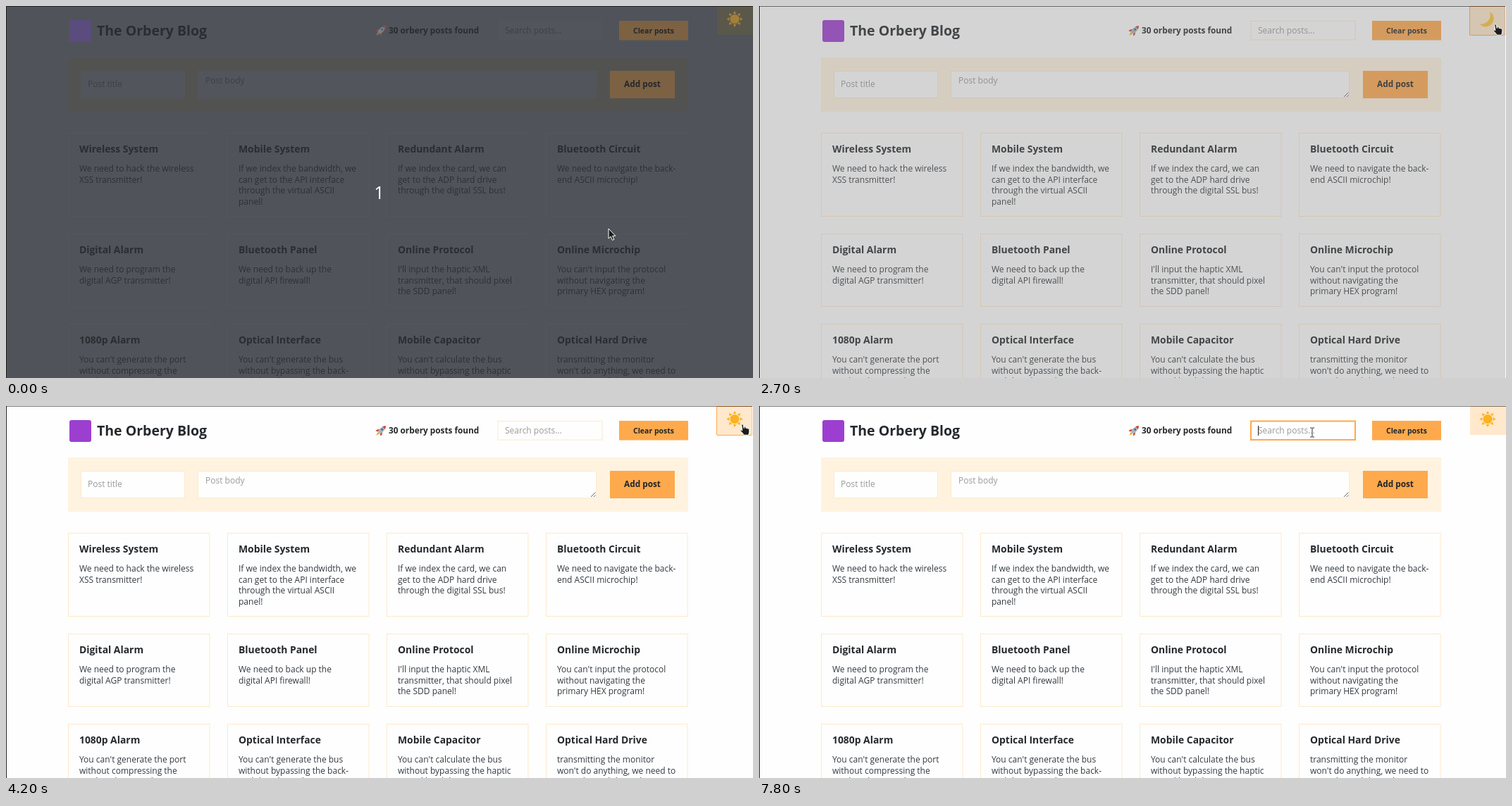
These frames come from a looping animation (1060 px wide and 528 px high, 8 s). An HTML page:

```html
<!DOCTYPE html>
<html lang="en">
<head>
<meta charset="utf-8">
<title>Blog theme toggle</title>
<style>
html, body { margin: 0; width: 100%; height: 100%; overflow: hidden; background: #fefefe; }
svg { position: absolute; left: 0; top: 0; width: 1060px; height: 528px; display: block; }
body {
  --bg: #fefefe; --strong: #25292d; --text: #343a40; --hint: #9a9a98;
  --form: #fff3e0; --field: #fefefe; --line: #ffe8cc; --btn: #ffa94d;
  --btnText: #212529; --toggle: #ffe8cc; --logo: #9c3fd0; --icon: 1;
}
body.count {
  --bg: #50545a; --strong: #2a2d31; --text: #2d3135; --hint: #3d4146;
  --form: #525351; --field: #52555b; --line: #535559; --btn: #7d6143;
  --btnText: #26282b; --toggle: #5a574b; --logo: #5b4c7e; --icon: .45;
}
text { font-family: "Open Sans", "Noto Sans", sans-serif; font-size: 12px; fill: var(--text); white-space: pre; }
.b { font-weight: 700; fill: var(--strong); }
.hint { fill: var(--hint); }
.btnText { font-weight: 700; fill: var(--btnText); text-anchor: middle; }
.bg { fill: var(--bg); }
.form { fill: var(--form); }
.field { fill: var(--field); stroke: var(--line); }
.card { fill: none; stroke: var(--line); }
.btn { fill: var(--btn); }
.toggle { fill: var(--toggle); }
.logo { fill: var(--logo); }
.icon { opacity: var(--icon); }
.cursor { fill: #1c1c1c; stroke: #fff; stroke-width: 1; stroke-linejoin: round; }
</style>
</head>
<body>
<svg id="page" viewBox="0 0 1060 528">
  <rect class="bg" width="1060" height="528"/>
  <rect class="logo" x="90" y="20" width="31" height="31" rx="3"/>
  <text class="b" x="129" y="42" style="font-size:19.5px">The Orbery Blog</text>

  <g class="icon" transform="translate(532.5 34.5) rotate(45)">
    <path d="M-1.6 5L0 10.5 1.6 5Z" fill="#ffa000"/>
    <path d="M-2.5 0L-5 3.5V6.5L-2.2 4.5ZM2.5 0L5 3.5V6.5L2.2 4.5Z" fill="#d8402f"/>
    <path d="M0-9C3.6-5.5 3.6 1 2.2 5H-2.2C-3.6 1-3.6-5.5 0-9Z" fill="#a9b6bd"/>
    <path d="M0-9C1.3-7.8 2.1-6.5 2.4-5H-2.4C-2.1-6.5-1.3-7.8 0-9Z" fill="#d8402f"/>
    <circle cy="-1.7" r="1.5" fill="#35718f"/>
  </g>
  <text class="b" x="543" y="39" style="font-size:11.8px">30 orbery posts found</text>

  <rect id="search" class="field" x="698" y="21.5" width="148" height="26.5"/>
  <text class="hint" x="708" y="39">Search posts...</text>
  <path id="caret" d="M708.5 28V42" stroke="#222"/>
  <rect class="btn" x="870" y="21" width="98" height="27.5"/>
  <text class="btnText" x="919" y="38.5" style="font-size:10.5px">Clear posts</text>

  <rect class="form" x="88" y="73" width="880" height="77"/>
  <rect class="field" x="106.5" y="92.5" width="147" height="38"/>
  <text class="hint" x="116" y="115">Post title</text>
  <rect class="field" x="272.5" y="92.5" width="565" height="38"/>
  <text class="hint" x="283" y="110">Post body</text>
  <path d="M830 129L836.5 122.5M834 129L836.5 126.5" stroke="#555" stroke-width=".9"/>
  <rect class="btn" x="857" y="92" width="92" height="39"/>
  <text class="btnText" x="903" y="115.3" style="font-size:11.8px">Add post</text>

  <g id="cards"></g>

  <rect class="toggle" x="1009" y="0" width="51" height="41"/>
  <rect id="ring" x="1008.5" y=".5" width="50.5" height="41" rx="1.5" fill="none" stroke="#ffa94d"/>
  <g id="sun" class="icon" transform="translate(1034 18.5)" fill="#fbb323"></g>
  <path id="moon" d="M1037 8A11.5 11.5 0 1 1 1022.5 25.5A13.2 13.2 0 0 0 1037 8Z" fill="#fcc63a"/>
</svg>

<svg id="over" viewBox="0 0 1060 528">
  <rect width="1060" height="1" fill="#000" opacity=".5"/>
  <rect width="1" height="528" fill="#222"/>
  <rect id="edge" x="1059" width="1" height="528" fill="#fdfdfd"/>
  <text id="digit" x="529.5" y="273.5" text-anchor="middle" style="font-size:25.5px;fill:#fff">1</text>
  <g id="cursor">
    <path id="arrow" class="cursor" d="M0 0V14L3.2 11.2 5.5 16.4 7.9 15.4 5.6 10.3H9.8Z"/>
    <path id="hand" class="cursor" d="M-1.2 1.2C-1.4-.4 1-.6 1.3 1L2.2 5.6C3-.0 5 4.6 5.2 5.8C6 4.8 7.4 5.2 7.6 6.3C8.6 5.7 9.6 6.3 9.7 7.6C9.9 10 9.8 12 8.6 15.2H2C.8 12.6-1.4 11-2.8 9.2C-3.2 8-1.5 7.4-.2 9Z"/>
    <g id="beam" fill="none">
      <path d="M-3-6.5H3M-3 6.5H3M0-6.5V6.5" stroke="#fff" stroke-width="2.4" opacity=".7"/>
      <path d="M-3-6.5H-.8L0-5.8 .8-6.5H3M-3 6.5H-.8L0 5.8 .8 6.5H3M0-6V6" stroke="#333"/>
    </g>
  </g>
</svg>

<script>
const LOOP = 8000, STEP = 100;
const $ = id => document.getElementById(id);

const rows = [
  { y: 180.5, h: 118, posts: [
    "Wireless System|We need to hack the wireless|XSS transmitter!",
    "Mobile System|If we index the bandwidth, we|can get to the API interface|through the virtual ASCII|panel!",
    "Redundant Alarm|If we index the card, we can|get to the ADP hard drive|through the digital SSL bus!",
    "Bluetooth Circuit|We need to navigate the back-|end ASCII microchip!"] },
  { y: 323.5, h: 103, posts: [
    "Digital Alarm|We need to program the|digital AGP transmitter!",
    "Bluetooth Panel|We need to back up the|digital API firewall!",
    "Online Protocol|I'll input the haptic XML|transmitter, that should pixel|the SDD panel!",
    "Online Microchip|You can't input the protocol|without navigating the|primary HEX program!"] },
  { y: 451.5, h: 103, posts: [
    "1080p Alarm|You can't generate the port|without compressing the|auxiliary bus panel!",
    "Optical Interface|You can't generate the bus|without bypassing the back-|end digital panel!",
    "Mobile Capacitor|You can't calculate the bus|without bypassing the haptic|neural hard drive!",
    "Optical Hard Drive|transmitting the monitor|won't do anything, we need to|input the mobile card!"] }
];

function cardMarkup(post, col, { y, h }) {
  const [title, ...lines] = post.split("|");
  const x = 104 + 226 * col;
  const body = lines.map((s, i) => `<text x="${x}" y="${y + 54.5 + 15.5 * i}">${s}</text>`).join("");
  return `<rect class="card" x="${x - 15.5}" y="${y}" width="200.5" height="${h}"/>` +
    `<text class="b" x="${x}" y="${y + 27}" style="font-size:13.9px">${title}</text>${body}`;
}
$("cards").innerHTML = rows.map(r => r.posts.map((p, i) => cardMarkup(p, i, r)).join("")).join("");

$("sun").innerHTML = '<circle r="6.6"/>' + Array.from({ length: 8 }, (_, i) =>
  `<path d="M-2.4-7.6L0-11.6 2.4-7.6Z" transform="rotate(${45 * i})"/>`).join("");

// time, x, y of the pointer
const path = [
  [1100, 855, 316], [1200, 858, 298], [1300, 878, 220], [1400, 911, 128], [1500, 946, 68],
  [1600, 975, 39], [1700, 1008, 24], [1800, 1038, 16], [1900, 1051, 14],
  [2000, 1051, 14], [2300, 1045, 26], [4700, 1045, 26],
  [4800, 1038, 18], [4900, 965, 8], [5000, 800, 22], [5200, 375, 76], [5300, 215, 98],
  [5400, 153, 106], [5500, 165.5, 103.5], [6700, 165.5, 103.5],
  [6800, 176, 100], [6900, 290, 82], [7100, 760, 34], [7200, 930, 25], [7300, 1016, 22],
  [7400, 930, 29], [7500, 825, 36], [7600, 785, 37.5]
];

function pointer(t) {
  const i = path.findIndex(p => p[0] > t);
  if (i === 0) return path[0].slice(1);
  if (i < 0) return path[path.length - 1].slice(1);
  const [a, b] = [path[i - 1], path[i]];
  const k = (t - a[0]) / (b[0] - a[0]);
  return [a[1] + (b[1] - a[1]) * k, a[2] + (b[2] - a[2]) * k];
}

// left, top, right, bottom
const fields = [[106, 92, 254, 131], [272, 92, 838, 131], [698, 21, 846, 49]];
const buttons = [[870, 21, 968, 49], [857, 92, 949, 131], [1009, 0, 1060, 41]];

function pointerKind(x, y) {
  const inside = ([l, t, r, b]) => x >= l && x <= r && y >= t && y <= b;
  return fields.some(inside) ? "beam" : buttons.some(inside) ? "hand" : "arrow";
}

// CSS "ease": cubic-bezier(.25, .1, .25, 1)
function ease(x) {
  if (x <= 0) return 0;
  if (x >= 1) return 1;
  const bez = (s, a, b) => 3 * s * (1 - s) * ((1 - s) * a + s * b) + s ** 3;
  let lo = 0, hi = 1;
  for (let i = 0; i < 24; i++) {
    const mid = (lo + hi) / 2;
    if (bez(mid, .25, .25) < x) lo = mid; else hi = mid;
  }
  return bez(lo, .1, 1);
}

const show = (id, on) => { $(id).style.display = on ? "" : "none"; };

function draw(time) {
  const t = Math.floor(time / STEP) * STEP;
  const counting = t < 100;
  const moon = t >= 2600 && t < 4000;
  const toggleFocus = t >= 2500 && t < 7700;
  const searchFocus = t >= 7700;

  document.body.className = counting ? "count" : "";
  const invert = t < 4000 ? ease((t - 2644) / 400) : 1 - ease((t - 3900) / 300);
  $("page").style.filter = invert ? `invert(${invert})` : "none";

  show("digit", counting);
  show("moon", moon);
  show("sun", !moon);
  show("ring", toggleFocus);
  show("edge", toggleFocus);
  show("caret", searchFocus);
  $("search").style.stroke = searchFocus ? "#ffa94d" : "";
  $("search").style.strokeWidth = searchFocus ? 2 : 1;

  const [x, y] = pointer(t);
  const kind = pointerKind(x, y);
  for (const id of ["arrow", "hand", "beam"]) show(id, id === kind);
  $("cursor").setAttribute("transform", `translate(${x} ${y})`);
}

const start = performance.now();
function tick() {
  draw((performance.now() - start) % LOOP);
  requestAnimationFrame(tick);
}
tick();
</script>
</body>
</html>
```
